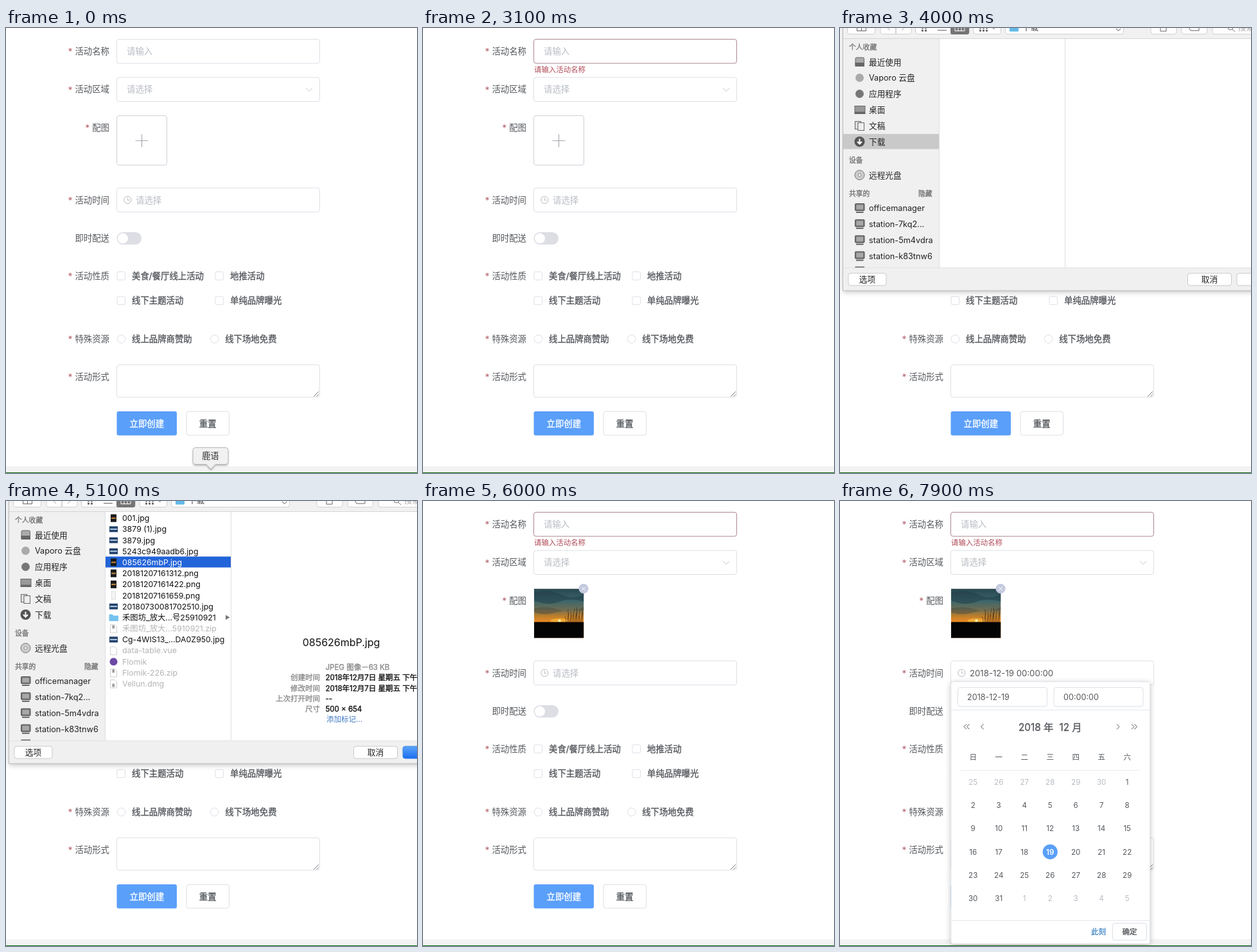
Write an HTML page that moves like this. It is 640 px wide and 693 px high and loops after 8 s.

```html
<!DOCTYPE html>
<html lang="zh-CN">
<head>
<meta charset="utf-8">
<title>活动表单</title>
<style>
html, body { margin: 0; width: 100%; height: 100%; overflow: hidden; background: #fff; }
svg { display: block; width: 100vw; height: 100vh; }
text { font-family: Inter, "Noto Sans CJK SC", "Noto Sans CJK", sans-serif; white-space: pre; }
</style>
</head>
<body>
<svg id="stage" viewBox="0 0 640 693" xmlns="http://www.w3.org/2000/svg"></svg>
<script>
const LOOP = 8000;
const INK = '#55585d', HINT = '#b8bcc3', LINE = '#dcdfe6', BLUE = '#5a9ffa', LINK = '#4a8ac9';
const STAR = '#b5616b', ALERT = '#b04a56';

// ---- markup helpers ----
const tag = (name, attrs, body = '') =>
  `<${name} ${Object.entries(attrs).map(([k, v]) => `${k}="${v}"`).join(' ')}>${body}</${name}>`;
const group = (id, body, more = {}) => tag('g', { id, ...more }, body);
const rect = (x, y, width, height, fill, more = {}) => tag('rect', { x, y, width, height, fill, ...more });
const box = (x, y, w, h, more = {}) => rect(x, y, w, h, '#fff', { stroke: LINE, rx: 3.5, ...more });
const circle = (cx, cy, r, fill, more = {}) => tag('circle', { cx, cy, r, fill, ...more });
const path = (d, stroke, more = {}) => tag('path', { d, stroke, fill: 'none', ...more });
// Text is placed by its vertical centre.
const text = (x, cy, str, size = 13.4, fill = INK, more = {}) =>
  tag('text', { x, y: (cy + size * 0.365).toFixed(2), 'font-size': size, fill, ...more }, str);
const medium = color => ({ stroke: color, 'stroke-width': 0.35 });
const mid = { 'text-anchor': 'middle' }, end = { 'text-anchor': 'end' };

// ---- form ----
function label(str, cy, required = true) {
  const x = 161 - str.length * 13.4;
  return text(x, cy, str) + (required ? text(x - 11, cy + 1, '*', 14, STAR) : '');
}

function choice(x, cy, str, round) {
  const mark = round ? circle(x + 7, cy, 6.3, '#fff', { stroke: LINE })
                     : box(x + 0.5, cy - 6.3, 12.6, 12.6, { rx: 2 });
  return mark + text(x + 23.5, cy, str, 13.4, INK, medium(INK));
}

function form() {
  return [
    label('活动名称', 36), box(172.5, 17.5, 316, 37.5, { id: 'nameBox' }),
    text(188, 36, '请输入', 13.4, HINT),
    rect(188, 28, 1, 16, '#444', { id: 'nameCaret' }),
    group('error', text(173, 65, '请输入活动名称', 11.45, ALERT)),

    label('活动区域', 95.5), box(172.5, 77, 316, 37.5),
    text(188, 95.5, '请选择', 13.4, HINT),
    path('M467 93.5l5 5 5-5', '#bfc3ca'),

    label('配图', 155),
    group('adder', box(172.5, 136.5, 78, 77, { stroke: '#cfd1d6' }) +
      path('M201.5 175.5h20M211.5 165.5v20', '#a9abb0', { 'stroke-width': 1.2 })),
    group('thumb', photo(173, 136.5, 77.5, 77) +
      circle(250, 136.5, 7.6, '#c3c9de') + path('M247 133.5l6 6m0-6l-6 6', '#fff')),

    label('活动时间', 268), box(172.5, 249, 316, 37.5, { id: 'dateBox' }),
    circle(189.3, 267.8, 5.6, 'none', { stroke: '#b4b8bf' }), path('M189.3 264.5v3.6h3', '#b4b8bf'),
    text(202, 268, '请选择', 13.4, HINT, { id: 'dateHint' }),
    text(202, 268, '2018-12-19 00:00:00', 13.2, INK, { id: 'dateValue' }),
    rect(202, 260, 1, 16, '#444', { id: 'dateCaret' }),

    label('即时配送', 327.5, false),
    rect(172.5, 318, 38.5, 19.3, '#dcdee4', { rx: 9.6 }), circle(182, 327.6, 8, '#fff'),

    label('活动性质', 386),
    choice(172.5, 386, '美食/餐厅线上活动'), choice(325.5, 386, '地推活动'),
    choice(172.5, 424.5, '线下主题活动'), choice(325.5, 424.5, '单纯品牌曝光'),

    label('特殊资源', 484),
    choice(172.5, 484.3, '线上品牌商赞助', true), choice(317.7, 484.3, '线下场地免费', true),

    label('活动形式', 543), box(172.5, 524.5, 316, 50.5),
    path('M479 574l8-8M483.5 574l3.5-3.5', '#777'),

    rect(172.5, 597, 93.5, 37.5, BLUE, { rx: 3 }),
    text(219.3, 616, '立即创建', 13.4, '#fff', { ...mid, ...medium('#fff') }),
    box(281, 597.2, 66.5, 37),
    text(314.2, 616, '重置', 13.4, INK, { ...mid, ...medium(INK) })
  ].join('');
}

// Dusk over a dark field, as soft shapes.
function photo(x, y, w, h) {
  let stalks = '';
  for (let i = 0; i < 14; i++) {
    const foot = 64 + i * 2.5, tall = 12 + (i * 7) % 19;
    stalks += `M${foot} 68q1 ${-tall / 2} ${(i * 5) % 9 - 2} ${-tall}`;
  }
  const body = rect(0, 0, 100, 100, 'url(#sky)') +
    tag('path', { d: 'M0 8Q30 0 55 12T100 10V26Q70 18 50 27T0 24z', fill: '#1f3a44', opacity: 0.5 }) +
    tag('path', { d: 'M0 40Q25 34 48 42T100 37V44Q70 41 45 48T0 48z', fill: '#4a4a3c', opacity: 0.45 }) +
    tag('ellipse', { cx: 51, cy: 65, rx: 18, ry: 5, fill: '#ffc23d', opacity: 0.6 }) +
    circle(51, 65, 3, '#fff0a0') +
    path(stalks, '#1c170e', { 'stroke-width': 0.6 }) + rect(0, 67.5, 100, 32.5, '#040404');
  return tag('svg', { x, y, width: w, height: h, viewBox: '0 0 100 100', preserveAspectRatio: 'none' }, body);
}

// ---- file sheet ----
const FILES = ['001.jpg', '3879 (1).jpg', '3879.jpg', '5243c949aadb6.jpg', '085626mbP.jpg',
  '20181207161312.png', '20181207161422.png', '20181207161659.png', '20180730081702510.jpg',
  '禾图坊_放大...号25910921', '禾图坊_放大...5910921.zip', 'Cg-4WIS13_...DA0Z950.jpg',
  'data-table.vue', 'Flomik', 'Flomik-226.zip', 'Vellun.dmg'];
const PICKED = 4;
const dimmed = i => i === 10 || i > 11;

function fileIcon(i, cy) {
  if (i === 9) return tag('path', { d: `M160.5 ${cy - 5}h5l2 2h7.5v8.5h-14.5z`, fill: '#74c3ee' });
  if (i === 13) return circle(167.5, cy, 6, '#6a4aa5');
  if (i === 7) return rect(164.5, cy - 6, 6, 12, '#f5f5f5', { stroke: '#ddd' });
  if (dimmed(i)) {
    const page = path(`M162.5 ${cy - 6}h7l3 3v9.5h-10z`, '#d0d0d0');
    return page + (i === 12 ? '' : rect(165.5, cy - (i === 15 ? 0 : 5), 3.5, 5, '#999'));
  }
  const tall = [0, 4, 5, 6].includes(i), w = tall ? 9 : 13, h = tall ? 12 : 9;
  return rect(167.5 - w / 2, cy - h / 2, w, h, tall ? '#17191c' : '#20406a') +
    rect(167.5 - w / 2 + 1, cy - 1, w - 2, 2, tall ? '#c98a3c' : '#b9cfe2');
}

function fileRow(name, i) {
  const cy = 26.7 + i * 17.19, ink = dimmed(i) ? '#b4b4b4' : '#111';
  return fileIcon(i, cy) + text(181, cy, name, 12.35, ink, i === PICKED ? { id: 'pickedName' } : {});
}

const screen = cy => rect(23.5, cy - 7, 14.5, 11, '#777', { rx: 1, stroke: '#555' }) +
  rect(25.5, cy - 5, 10.5, 7, '#a8a8a8') + rect(25, cy + 5.5, 11.5, 2, '#666');

function sidebar() {
  const head = (x, cy, str) => text(x, cy, str, 10.8, '#777', medium('#777'));
  const item = (cy, str, icon) => icon + text(45, cy, str, 12.7, '#222');
  const gray = { stroke: '#666' };
  const hosts = ['officemanager', 'station-7kq2...', 'station-5m4vdra', 'station-k83tnw6'];
  return rect(5, 17, 149, 356, '#f1f0f1') +
    rect(5, 165, 149, 23.5, '#c9c9c9', { id: 'place' }) +
    head(14, 30.5, '个人收藏') +
    item(53, '最近使用', box(24, 46, 13.5, 13, { ...gray, rx: 2, fill: '#aaa' }) + rect(23.5, 54, 14.5, 6, '#666')) +
    item(77.5, 'Vaporo 云盘', circle(30.5, 77.5, 6.5, '#aaa')) +
    item(102.5, '应用程序', circle(30.5, 102.5, 6.5, '#777')) +
    item(127.5, '桌面', rect(23, 121.5, 16, 12, '#999', gray) + rect(23, 130.5, 16, 2.5, '#666')) +
    item(152.5, '文稿', rect(23.5, 145.5, 9, 12, '#ddd', gray) + rect(28, 147.5, 9.5, 12, '#eee', gray)) +
    item(177, '下载', circle(30.5, 177, 8, '#555') +
      path('M30.5 172.5v7M27 177l3.5 3.5 3.5-3.5', '#fff', { 'stroke-width': 2 })) +
    head(14, 206.5, '设备') +
    item(229, '远程光盘', circle(30.5, 229, 7.5, '#ccc', { stroke: '#777' }) + circle(30.5, 229, 2.3, '#fff', { stroke: '#888' })) +
    head(14, 258, '共享的') + head(122, 258, '隐藏') +
    hosts.map((h, i) => item(280.5 + i * 24.9, h, screen(280.5 + i * 24.9))).join('') +
    rect(23.5, 371.5, 14.5, 1.5, '#666');
}

function toolbar() {
  const key = (x, w, more = {}) => box(x, -12, w, 21.5, { stroke: '#d0d0d0', ...more });
  const dots = (x, n) => Array.from({ length: n * 2 }, (_, i) =>
    rect(x + (i % n) * 5, -2 + Math.floor(i / n) * 4.5, 3, 3, '#666')).join('');
  return rect(5, -60, 640, 77, '#f2f1f2') + path('M5 16.5H640', '#d5d5d5') +
    key(11.5, 43) + path('M26.5 -5v9.5h14v-9.5M33.5 -5v9.5', '#666') +
    key(63, 48) + path('M78 -6l-5 5 5 5M96 -6l5 5-5 5M87 -12v21', '#aaa') +
    key(117.5, 84) + rect(172, -12, 29, 22, '#757575', { rx: 3 }) +
    dots(127, 2) + path('M152 -1.5h14M152 3.5h14', '#666') + path('M179 -5v9.5h15v-9.5M184 -5v9.5M189 -5v9.5', '#fff') +
    key(208, 42.5) + dots(217, 3) + path('M237 -1l2.5 2.5 2.5-2.5', '#666') +
    key(257.5, 184) + rect(264, -4, 14, 9.5, '#62b9ea', { rx: 1 }) + text(284, -1, '下载', 12.5, '#444') +
    path('M430 1l3.5 3.5 3.5-3.5', '#555') +
    key(484, 40) + path('M499 -5v10h9v-10', '#666') +
    key(532, 39.5) + path('M546 -6l-3 5 3 5h13v-10', '#666') +
    key(580, 80) + circle(608, -1, 4, 'none', { stroke: '#777' }) + path('M611 2l4 4', '#777') +
    text(620, -1, '搜索', 12.5, '#aaa');
}

function details() {
  const rows = [['', 'JPEG 图像－63 KB'], ['创建时间', '2018年12月7日 星期五 下午 4:16'],
    ['修改时间', '2018年12月7日 星期五 下午 4:16'], ['上次打开时间', '--'], ['尺寸', '500 × 654']];
  const line = (x, cy, str, color, more) => text(x, cy, str, 11.5, color, { ...medium(color), ...more });
  return text(522, 220, '085626mbP.jpg', 16, '#111', mid) +
    rows.map(([k, v], i) => line(489, 259 + i * 16.2, k, '#8a8a8a', end) +
      line(497.5, 259 + i * 16.2, v, i ? '#111' : '#8a8a8a')).join('') +
    text(499, 340, '添加标记...', 11.5, '#3f78c4') +
    group('preview', photo(456, 27, 132, 173));
}

function sheet() {
  const key = (x, w, more = {}) => box(x, 382, w, 19, { stroke: '#cacaca', ...more });
  return rect(5, -60, 660, 469, '#f0f0f0', { filter: 'url(#soft)' }) +
    rect(154, 17, 500, 356, '#fff') + sidebar() + toolbar() +
    group('files', rect(154, 86.5, 196, 17, '#2264d9', { id: 'pickedRow' }) +
      FILES.map(fileRow).join('') + tag('path', { d: 'M342 177.5l6.5 3.7-6.5 3.7z', fill: '#777' })) +
    path('M154.5 17V373M350.5 17V373', '#dedede') +
    group('details', details()) +
    rect(5, 373, 640, 36, '#f0f0f0') + path('M5 373.5H640', '#e2e2e2') + path('M4.5 0V409H640', '#bbb') +
    key(13, 59) + text(42.5, 391.5, '选项', 12.7, '#222', mid) +
    key(541.5, 68) + text(575.5, 391.5, '取消', 12.7, '#222', mid) +
    key(618, 70, { id: 'openKey' });
}

// ---- date picker ----
function dateCells() {
  let out = '';
  for (let i = 0; i < 42; i++) {
    const n = i - 5, x = 207.2 + (i % 7) * 40, cy = 437.5 + Math.floor(i / 7) * 36.3;
    const day = n < 1 ? n + 30 : n > 31 ? n - 31 : n;
    if (n === 19) out += circle(x, cy, 11.6, BLUE, { id: 'dayDot' });
    out += text(x, cy, day, 11.6, n < 1 || n > 31 ? HINT : INK,
      n === 19 ? { ...mid, id: 'today', 'font-weight': 600 } : mid);
  }
  return out;
}

function picker() {
  const strong = (x, s) => text(x, 352, s, 15.3, INK, medium(INK));
  return rect(173, 281.5, 309.5, 408, '#fff', { stroke: '#e2e5ea', rx: 3.5, filter: 'url(#soft)' }) +
    box(183.5, 290.5, 139, 29.5) + box(333, 290.5, 139, 29.5) +
    group('pickHints', text(198, 305.3, '选择日期', 12.7, HINT) + text(348, 305.3, '选择时间', 12.7, HINT)) +
    group('pickValues', text(198, 305.3, '2018-12-19', 12.6, INK) + text(348, 305.3, '00:00:00', 12.6, INK)) +
    path('M173 325.5H482M173 653.5H482', '#e4e7ed') +
    path('M197 347.5l-4 4 4 4M201.5 347.5l-4 4 4 4M223.5 347.5l-4 4 4 4M431 347.5l4 4-4 4M454 347.5l4 4-4 4M458.5 347.5l4 4-4 4', '#555') +
    strong(278, '2018 年') + strong(341.5, '12 月') +
    [...'日一二三四五六'].map((d, i) => text(207.2 + i * 40, 399, d, 11.5, INK, mid)).join('') +
    path('M187 419.5H466', '#ebeef5') + dateCells() +
    text(391, 670.8, '此刻', 11.5, LINK, medium(LINK)) +
    box(424.5, 657.5, 53, 26.5) + text(451, 670.8, '确定', 11.5, INK, { ...mid, ...medium(INK) });
}

function dock() {
  return rect(0, 682.5, 640, 9.5, '#f3f3f3') +
    group('tip', tag('path', {
      d: 'M295 653.5h47q4 0 4 4v18q0 4-4 4h-16l-7 7.5-7-7.5h-17q-4 0-4-4v-18q0-4 4-4z',
      fill: '#f1f1f1', stroke: '#b5b5b5', filter: 'url(#faint)' }) +
      text(318.3, 666, '鹿语', 13.4, '#333', mid));
}

const shade = (id, blur, a) => tag('filter', { id, x: '-10%', y: '-10%', width: '120%', height: '125%' },
  `<feDropShadow dx="0" dy="2" stdDeviation="${blur}" flood-opacity="${a}"/>`);
const fade = (id, stops) => tag('linearGradient', { id, x1: 0, y1: 0, x2: 0, y2: 1 },
  stops.map(([offset, c]) => tag('stop', { offset, 'stop-color': c })).join(''));
const defs = tag('defs', {}, shade('soft', 4, 0.25) + shade('faint', 1, 0.25) +
  fade('key', [[0, '#5ba4f8'], [1, '#1a6cf0']]) +
  fade('sky', [[0, '#28464f'], [0.25, '#3d666b'], [0.42, '#6c6d54'], [0.56, '#c07f2a'], [0.67, '#ea8a26']]));

const stage = document.getElementById('stage');
stage.innerHTML = defs + rect(0, 0, 640, 693, '#fff') + form() + dock() +
  group('picker', picker()) + group('sheet', sheet()) + rect(0, 692, 640, 1, '#0a6b12');

// ---- motion ----
const parts = {};
stage.querySelectorAll('[id]').forEach(el => parts[el.id] = el);
const set = (id, key, value) => parts[id].setAttribute(key, value);
const show = (id, on) => set(id, 'visibility', on ? 'inherit' : 'hidden');
const span = (t, from, length) => Math.min(1, Math.max(0, (t - from) / length));
const smooth = p => p * p * (3 - 2 * p);
const easeOut = p => 1 - (1 - p) ** 3;
const mix = (a, b, p) => `rgb(${a.map((v, i) => Math.round(v + (b[i] - v) * p))})`;
const REST = [220, 223, 230], FOCUS = [112, 148, 178], WRONG = [172, 134, 141];
const growFrom = (id, y, s) => {
  set(id, 'transform', `translate(0 ${y * (1 - s)}) scale(1 ${Math.max(s, 0.001)})`);
  set(id, 'opacity', s);
};

function render(t) {
  show('tip', t < 100);

  set('nameBox', 'stroke', t < 2000 ? mix(REST, FOCUS, span(t, 1550, 200)) : mix(FOCUS, WRONG, span(t, 2000, 250)));
  show('nameCaret', t >= 1600 && t < 2000);
  growFrom('error', 59, easeOut(span(t, 2050, 300)));

  const lowered = smooth(span(t, 3640, 320)) - smooth(span(t, 5171, 294));
  set('sheet', 'transform', `translate(0 ${(420 * (lowered - 1)).toFixed(2)})`);
  set('sheet', 'display', lowered > 0 ? 'inline' : 'none');
  const picked = t >= 5000;
  show('files', t >= 4100);
  show('pickedRow', picked);
  set('pickedName', 'fill', picked ? '#fff' : '#111');
  show('place', !picked);
  show('details', picked);
  show('preview', t >= 5150);
  set('openKey', 'fill', picked ? 'url(#key)' : '#fff');
  set('openKey', 'stroke', picked ? '#3f86e6' : '#cacaca');

  show('adder', t < 5500);
  set('thumb', 'opacity', span(t, 5450, 400));

  const chosen = t >= 7500;
  set('dateBox', 'stroke', mix(REST, FOCUS, span(t, 6600, 200) - span(t, 7500, 200)));
  show('dateCaret', t >= 6620 && t < 7120);
  show('dateHint', !chosen);
  show('dateValue', chosen);
  growFrom('picker', 281, easeOut(span(t, 6613, 300)));
  show('pickHints', !chosen);
  show('pickValues', chosen);
  show('dayDot', chosen);
  set('today', 'fill', chosen ? '#fff' : LINK);
}

const start = performance.now();
function tick() {
  render((performance.now() - start) % LOOP);
  requestAnimationFrame(tick);
}
tick();
</script>
</body>
</html>
```
